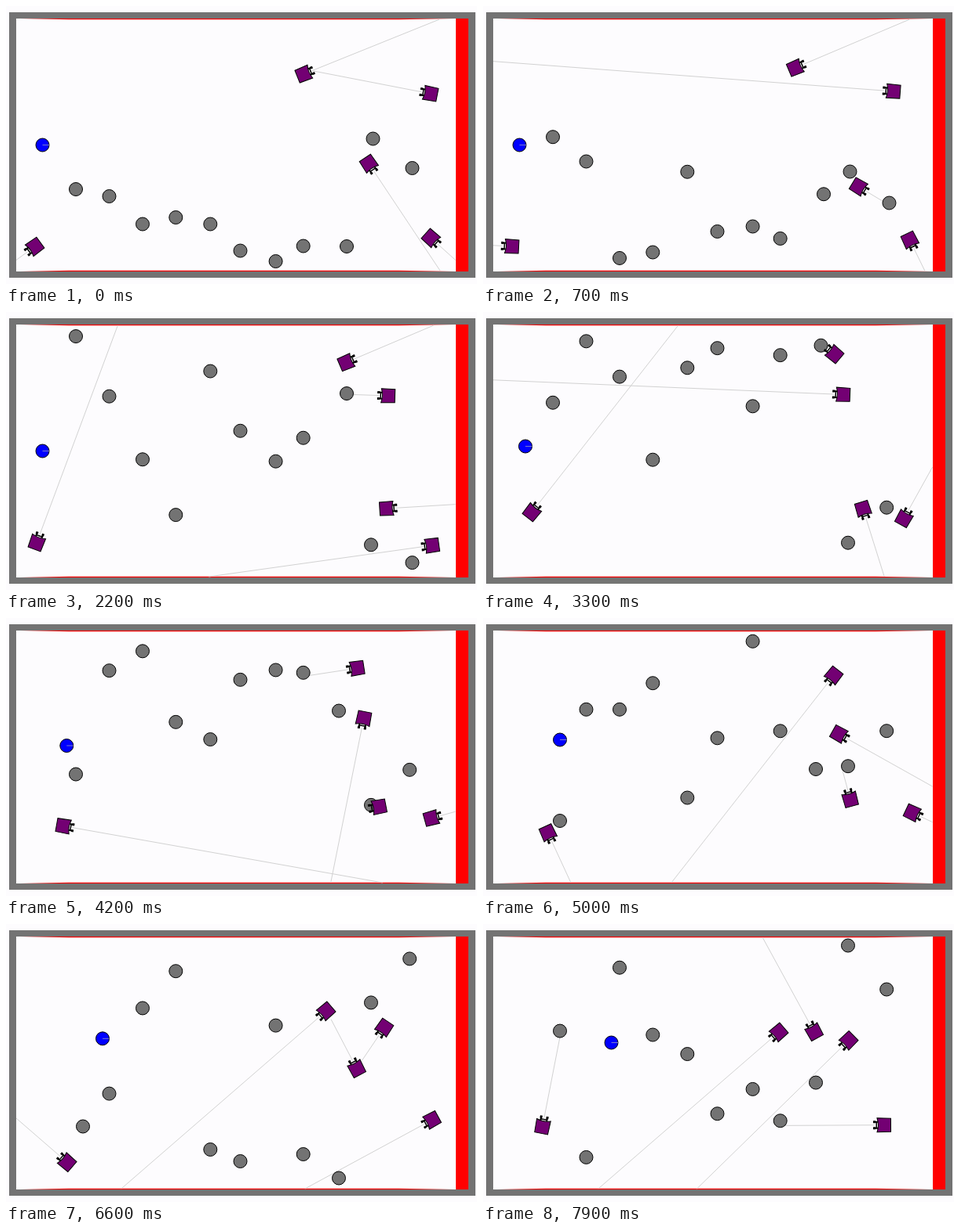
Write an HTML page with a canvas that moves like this. It is 600 px wide and 355 px high and loops after 8 s.

```html
<!DOCTYPE html>
<html>
<head>
<meta charset="utf-8">
<style>
html, body { margin: 0; width: 100%; height: 100%; overflow: hidden; background: #fdfcfe; }
canvas { display: block; }
</style>
</head>
<body>
<canvas id="stage" width="600" height="355"></canvas>
<script>
const g = document.getElementById('stage').getContext('2d');
const GRAY = '#737373', RED = '#ff0000';

// Time unit: 100 ms. TRAVEL is the distance a slow ball has covered at each tick.
const TICKS = [0, 7, 22, 33, 50, 66, 79];
const TRAVEL = [0, 44.5, 135.3, 205.7, 311.2, 411, 492.3];

// Balls go up and down; a bump [tick, lag, dx] is a touch by a robot or wall.
const ball = (x, y, v, bumps = [], turn = Infinity) => ({ x, y, v, bumps, turn });
const balls = [
  ball(89, 234, -1.5, [[49, 15, 9]]),
  ball(131.5, 243, -1, [[40, -2, 0]]),
  ball(174, 278.5, 1.5, [[10, 2.5, 0]], 57.5),
  ball(216.3, 270, 1, [[15, 2, 0], [60, 3, 0]]),
  ball(260.3, 278.5, -1.5),
  ball(298.5, 312.5, 1.5),
  ball(343.6, 326, -1, [[40, 2, 0]]),
  ball(378.7, 306.5, 1.5, [[3, 3, 0]]),
  ball(434, 307, -1.5, [[33, 0, -3.5], [34, 8, -6.5]]),
  ball(467.5, 169.5, 1, [[6, 2.5, 0], [14, 5, -2.5], [56, 11, 0]]),
  ball(517.5, 207, 1, [[26, 0, -3.3]])
];

// x, y and heading in degrees at each of TICKS
const robots = [
  [[379, 87, -22], [397.5, 79, -23], [433, 64.5, -23], [448, 54, -140],
   [447, 73, -232], [408, 111, -221], [377, 138, -221]],
  [[541, 112, 191], [523, 109, 184.3], [487, 107, 182], [459, 105.5, 182.4],
   [453, 148, 29.3], [482, 132, -236], [466, 148.5, -224.4]],
  [[462, 201, 56.4], [478, 230.5, 31], [484.5, 251, -3.5], [484, 251, 72.6],
   [468, 232, 255], [447, 185, 242.5], [422, 138, 241.4]],
  [[541, 296, 42], [543.5, 298.5, 64], [543, 298, 172], [536, 264, 299],
   [546.5, 248.5, 385], [543, 250, 511.5], [511, 256.7, 539.7]],
  [[37, 307, 144], [37, 307, 183], [39, 295, 290.4], [62, 256, 308],
   [82.5, 274, 425.3], [78, 304.5, 581], [75.7, 259, 641]]
];

const blueTicks = [29.5, 33, 50, 66, 79];
const bluePath = [[46.5, 177.5], [54, 171.5], [98, 155.5], [123, 146.3], [163.5, 151.5]];

// Linear interpolation of points along ticks
function at(points, t, ticks = TICKS) {
  let i = 0;
  while (i < ticks.length - 2 && ticks[i + 1] <= t) i++;
  const k = Math.max(0, (t - ticks[i]) / (ticks[i + 1] - ticks[i]));
  return points[i].map((v, j) => v + (points[i + 1][j] - v) * k);
}

const travel = t => at(TRAVEL.map(d => [d]), t)[0];

// Reflect an endless coordinate between two limits
function fold(u, lo, hi) {
  const period = 2 * (hi - lo);
  const m = ((u - lo) % period + period) % period;
  return lo + Math.min(m, period - m);
}

function ballAt(b, t) {
  const past = b.bumps.filter(p => p[0] <= t);
  const sum = j => past.reduce((s, p) => s + p[j], 0);
  const d = t > b.turn ? 2 * travel(b.turn) - travel(t) : travel(t);
  const u = b.y + b.v * d - Math.sign(b.v) * sum(1);
  const fast = Math.abs(b.v) > 1;
  return { x: b.x + sum(2), y: fast ? fold(u, 20.6, 333.6) : fold(u, 23.3, 331.2), r: 8.5 };
}

function line(x1, y1, x2, y2, color) {
  g.strokeStyle = color;
  g.beginPath();
  g.moveTo(x1, y1);
  g.lineTo(x2, y2);
  g.stroke();
}

function rect(color, x, y, w, h) {
  g.fillStyle = color;
  g.fillRect(x, y, w, h);
}

// Thin red strip along a wall, tapered at both ends
function taper(y, depth) {
  g.fillStyle = RED;
  g.beginPath();
  g.moveTo(18, y);
  g.lineTo(80, y + depth);
  g.lineTo(500, y + depth);
  g.lineTo(573, y);
  g.fill();
}

function drawArena() {
  rect('#fdfcfe', 0, 0, 600, 355);
  rect(GRAY, 4, 8, 594, 339);
  rect('#fdfcfe', 13, 16, 576, 323);
  rect(RED, 573, 16, 16, 323);
  taper(16, 1.3);
  taper(339, -1.3);
}

function drawBall(x, y, color) {
  g.fillStyle = color;
  g.strokeStyle = '#000';
  g.beginPath();
  g.arc(x, y, 8.5, 0, 7);
  g.fill();
  g.stroke();
}

// Sight line up to the nearest wall, ball or robot
function drawRay(r, things) {
  const dx = Math.cos(r.a), dy = Math.sin(r.a);
  let d = Math.min(((dx > 0 ? 572.5 : 13) - r.x) / dx, ((dy > 0 ? 338 : 17) - r.y) / dy);
  for (const o of things) {
    if (o === r) continue;
    const ox = o.x - r.x, oy = o.y - r.y;
    const along = ox * dx + oy * dy, off = ox * dy - oy * dx;
    if (along > 0 && Math.abs(off) < o.r) d = Math.min(d, along - Math.sqrt(o.r * o.r - off * off));
  }
  if (d > 12) line(r.x + 12 * dx, r.y + 12 * dy, r.x + d * dx, r.y + d * dy, '#d2d2d2');
}

function drawRobot({ x, y, a }) {
  g.save();
  g.translate(x, y);
  g.rotate(a);
  g.fillStyle = '#730073';
  g.strokeStyle = '#000';
  g.beginPath();
  g.moveTo(9, -9);
  g.quadraticCurveTo(6, 0, 9, 9);
  g.lineTo(-8.5, 8.5);
  g.lineTo(-8.5, -8.5);
  g.closePath();
  g.fill();
  g.stroke();
  rect('#000', 9, -4, 1.5, 8);
  for (const s of [-4, 4]) {
    rect('#000', 8, s - 1, 4, 2);
    rect('#000', 11, s - 1.5, 3, 3);
  }
  g.restore();
}

function draw(t) {
  drawArena();
  const grays = balls.map(b => ballAt(b, t));
  const bots = robots.map(path => {
    const [x, y, deg] = at(path, t);
    return { x, y, a: deg * Math.PI / 180, r: 12.5 };
  });
  const [bx, by] = at(bluePath, t, blueTicks);
  const things = [...grays, ...bots, { x: bx, y: by, r: 8.5 }];
  bots.forEach(r => drawRay(r, things));
  grays.forEach(b => drawBall(b.x, b.y, GRAY));
  drawBall(bx, by, '#0000ff');
  line(bx, by, bx + 8.5, by, '#7a7ac8');
  bots.forEach(drawRobot);
}

function frame() {
  draw(Math.floor(performance.now() % 8000 / 100));
  requestAnimationFrame(frame);
}
frame();
</script>
</body>
</html>
```
